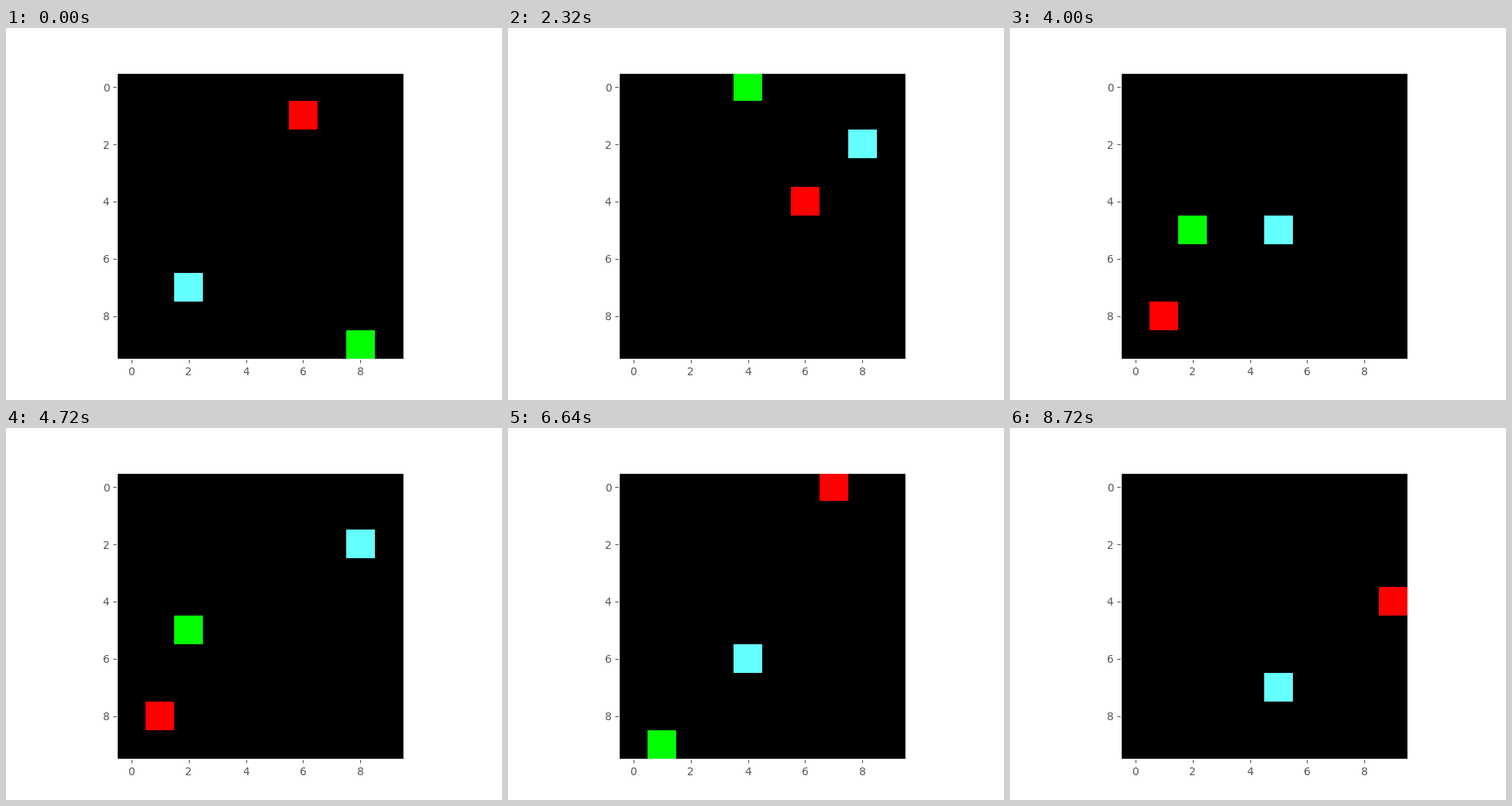
Recreate the animation shown at these times as a matplotlib script. Size 640 by 480 pixels, loop 8800 ms.

```python
import numpy as np
import matplotlib.pyplot as plt
from matplotlib.animation import FuncAnimation

SIZE = 10
STEP_MS = 80
RED, GREEN, CYAN = (255, 0, 0), (0, 255, 0), (100, 255, 255)

# Each episode: enemy cell, then the player's start and goals; food is the last goal.
EPISODES = [
    ((6, 1), [(2, 7), (8, 9)]),
    ((8, 2), [(0, 3), (6, 9), (5, 6)]),
    ((6, 4), [(4, 8), (9, 3), (6, 6), (9, 3), (4, 0)]),
    ((1, 0), [(2, 7), (5, 0), (7, 8)]),
    ((1, 8), [(5, 5), (2, 8), (8, 2), (5, 0), (3, 6), (7, 2), (2, 5)]),
    ((7, 0), [(9, 1), (1, 9)]),
    ((9, 4), [(9, 3), (0, 6), (7, 1), (5, 7)]),
]


def sidestep(pos):
    """Direction along one axis that leads back to the board's middle."""
    return 1 if pos <= SIZE // 2 else -1


def next_cell(pos, goal):
    """Move diagonally to the goal; zigzag when level with it.

    A diagonal move keeps the parity of x + y, so an odd gap
    needs a straight step instead of a zigzag.
    """
    gap = np.subtract(goal, pos)
    move = np.sign(gap)
    if gap.sum() % 2 == 0:
        move = [m or sidestep(p) for m, p in zip(move, pos)]
    return tuple(np.add(pos, move))


def walk(start, *goals):
    pos = start
    yield pos
    for goal in goals:
        while pos != goal:
            pos = next_cell(pos, goal)
            yield pos


def paint(enemy, food, player):
    grid = np.zeros((SIZE, SIZE, 3), dtype=np.uint8)
    for (x, y), color in ((food, GREEN), (player, CYAN), (enemy, RED)):
        grid[y, x] = color
    return grid


steps = [(enemy, route[-1], player)
         for enemy, route in EPISODES
         for player in walk(*route)]

plt.style.use("ggplot")
plt.rcParams["font.family"] = "DejaVu Sans"
fig, ax = plt.subplots(figsize=(6.4, 4.8), dpi=100)
ax.grid(False)
image = ax.imshow(paint(*steps[0]))


def update(i):
    image.set_data(paint(*steps[i]))
    return [image]


anim = FuncAnimation(fig, update, frames=len(steps), interval=STEP_MS,
                     repeat=True, repeat_delay=0)
plt.show()
```
